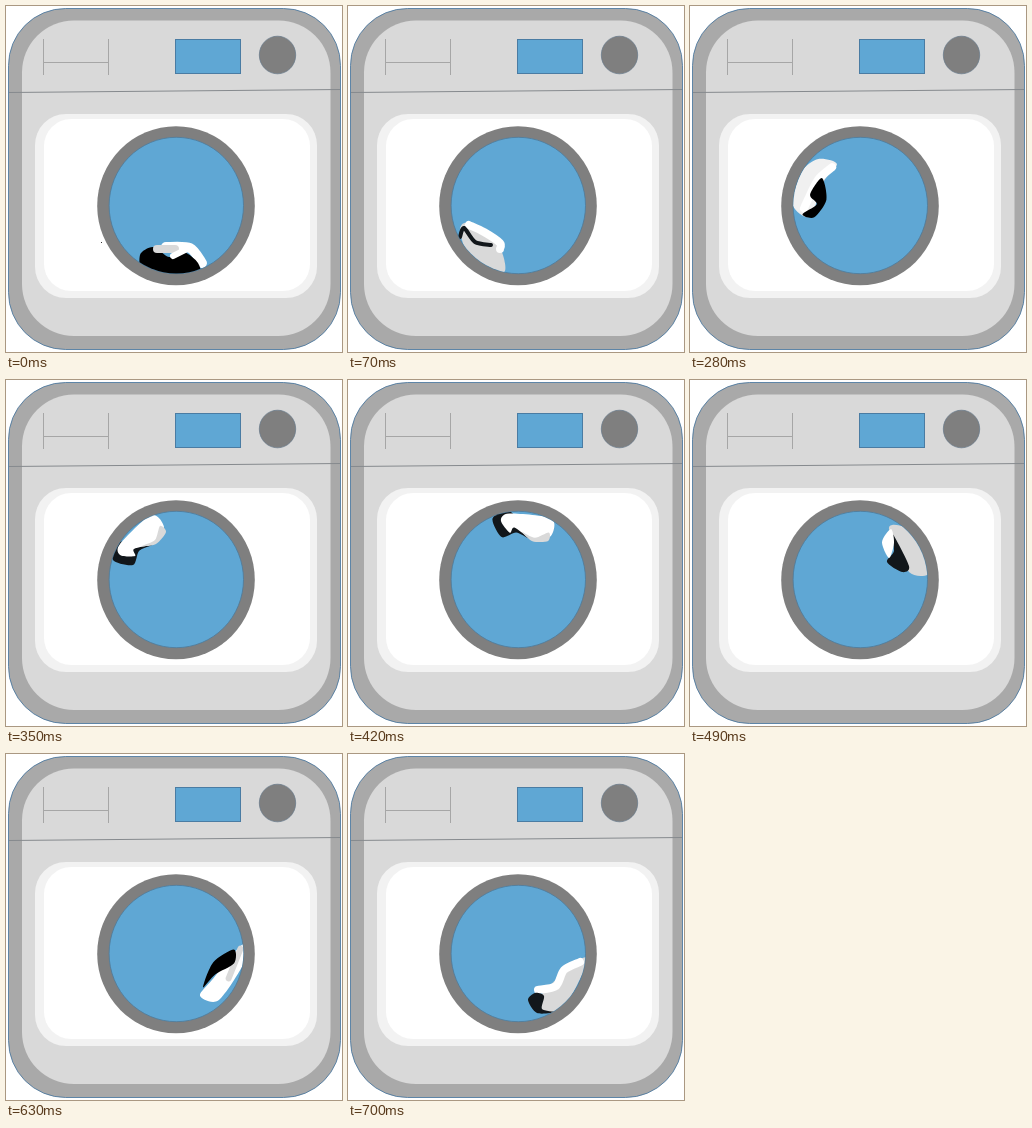
An HTML page that plays this animation: 336x346 px, repeating every 770 ms.

```html
<!DOCTYPE html>
<html>
<head>
<meta charset="utf-8">
<style>
html, body { margin: 0; width: 100%; height: 100%; overflow: hidden; background: #fff; }
svg { display: block; width: 336px; height: 346px; }
</style>
</head>
<body>
<svg viewBox="0 0 336 346">
  <defs><clipPath id="glass"><ellipse cx="170.3" cy="199.5" rx="67" ry="68"/></clipPath></defs>
  <rect x="2.5" y="2.5" width="332" height="341" rx="57" fill="#a9a9a9" stroke="#41719c" stroke-width=".8"/>
  <rect x="16" y="14.5" width="308.5" height="315.5" rx="52" fill="#d9d9d9"/>
  <rect x="29" y="108" width="282" height="184" rx="31" fill="#f2f2f2"/>
  <rect x="38" y="113" width="266" height="172" rx="27" fill="#fff"/>
  <path d="M37.5 33V69M102.5 33V69M37.5 56.5H102.5" fill="none" stroke="#a6a6a6"/>
  <path d="M3 86.5L334 83.5" stroke="#868a8e"/>
  <rect x="169.5" y="33.5" width="65" height="34" fill="#5fa7d4" stroke="#4a7ca3"/>
  <ellipse cx="271.5" cy="49" rx="18.2" ry="18.8" fill="#7f7f7f" stroke="#66798a" stroke-width=".7"/>
  <ellipse cx="170" cy="199.7" rx="78.8" ry="79.5" fill="#7f7f7f"/>
  <ellipse cx="170.3" cy="199.5" rx="67.2" ry="68.2" fill="#5fa7d4" stroke="#4f7a9a" stroke-width=".8"/>
  <g id="cloth" clip-path="url(#glass)"></g>
  <rect id="speck" x="95" y="236" width="1" height="1" fill="#333"/>
</svg>
<script>
const STEP = 70, LOOP = 770;
const WHITE = '#fff', GREY = '#d9d9d9', PALE = '#f0f0f0', BLACK = '#000', INK = '#12171b';

// Smooth curve through a few key points, closed or open.
function curve(text, closed) {
  const p = text.split(' ').map(s => s.split(',').map(Number));
  const n = p.length;
  const at = i => p[closed ? (i + n) % n : Math.max(0, Math.min(n - 1, i))];
  const ease = (a, b, c) => b.map((v, j) => v + (c[j] - a[j]) * 0.14);
  let d = 'M' + p[0];
  for (let i = 0; i < (closed ? n : n - 1); i++) {
    const a = at(i - 1), b = at(i), c = at(i + 1), e = at(i + 2);
    d += `C${ease(a, b, c)} ${ease(e, c, b)} ${c}`;
  }
  return d;
}

const patch = (fill, text) => `<path d="${curve(text, true)}" fill="${fill}"/>`;
const fold = (color, width, text) =>
  `<path d="${curve(text)}" fill="none" stroke="${color}" stroke-width="${width}" stroke-linecap="round"/>`;
const turn = (shape, deg) => `<g transform="rotate(${deg} 170.3 199.5)">${shape}</g>`;

const bottom =
  fold(WHITE, 10, '160,241 184,242 196,257') +
  patch(BLACK, '134,249 147,241 163,251 178,246 192,257 190,268 140,268') +
  fold(GREY, 8, '151,243 169,243') +
  fold(WHITE, 6, '179,244 167,250');

const lowLeft =
  patch(GREY, '112,224 121,217 150,238 156,266 122,250') +
  fold(WHITE, 8, '121,219 136,226 152,237 152,243') +
  fold(INK, 4, '112,231 116,222 127,236 143,239');

const left =
  patch(PALE, '103,192 113,174 132,171 127,193 129,230 108,226') +
  fold(WHITE, 8, '129,176 121,194 120,225') +
  patch(BLACK, '124,190 137,208 133,229 121,231 130,216 120,210');

const topLeft =
  patch(INK, '113,162 107,180 127,185 133,171 146,164') +
  patch(WHITE, '114,164 145,135 158,147 148,163 128,169 129,176 114,175') +
  patch(GREY, '154,146 160,152 150,164 136,166 149,160');

const topRight =
  patch(GREY, '199,149 212,146 226,157 240,192 219,192') +
  patch(INK, '202,153 219,186 212,192 197,182 204,171') +
  patch(WHITE, '201,149 192,162 199,178 204,163');

const right =
  patch(WHITE, '229,169 237,185 226,229 207,231 213,212') +
  fold(GREY, 6, '229,173 228,205') +
  patch(BLACK, '223,176 228,189 214,206 207,222 208,195');

const lowRight =
  patch(GREY, '228,208 240,206 222,244 206,258 194,256 194,240') +
  fold(WHITE, 8, '190,236 208,232 216,216 232,208') +
  patch(INK, '180,246 187,239 196,242 194,255 207,258 189,259');

const poses = [
  bottom, lowLeft, turn(lowLeft, 24), left, turn(left, 24), topLeft,
  turn(topLeft, 50), topRight, right, turn(right, 20), lowRight
];

const cloth = document.getElementById('cloth');
const speck = document.getElementById('speck');
let shown = -1;

function draw(ms) {
  const i = Math.floor((ms % LOOP) / STEP);
  if (i === shown) return;
  shown = i;
  cloth.innerHTML = poses[i];
  speck.setAttribute('visibility', i ? 'hidden' : 'visible');
}

draw(0);
const start = performance.now();
function tick() {
  draw(performance.now() - start);
  requestAnimationFrame(tick);
}
requestAnimationFrame(tick);
</script>
</body>
</html>
```
